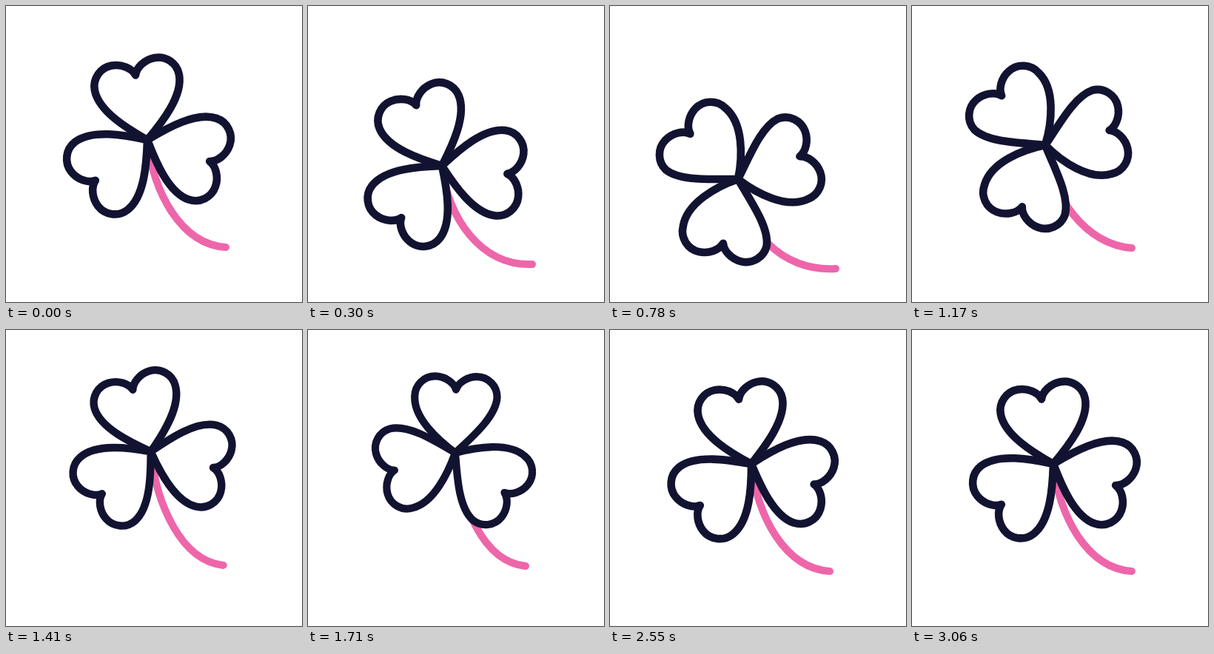
An HTML page that plays this animation: 400 px wide and 400 px high, repeating every 3.09 s.

```html
<!DOCTYPE html>
<html lang="en">
<head>
<meta charset="utf-8">
<title>Swaying clover</title>
<style>
  html, body { margin: 0; width: 100%; height: 100%; overflow: hidden; background: #fff; }
  svg { display: block; width: 100%; height: 100%; }
  path { stroke-linecap: round; stroke-linejoin: round; }
  #stem { fill: none; stroke: #ee66aa; stroke-width: 10; }
  .leaf { fill: #fff; stroke: #121331; stroke-width: 10.6; }
</style>
</head>
<body>
<svg viewBox="0 0 400 400">
  <path id="stem"/>
  <path class="leaf"/>
  <path class="leaf"/>
  <path class="leaf"/>
</svg>
<script>
const LOOP = 3090, STEP = 30;

// time, hub x, hub y, stem end x, stem end y, leaf angles (clockwise from up), bend at the base, leaf scale
const KEYS = [
  [0,    191, 181, 297, 326, -10.3, 109, 232, 0, 1],
  [300,  181, 216, 303, 349, -23, 97, 218, 0, 1],
  [540,  171, 239, 306, 358, -35, 84, 205, 4, 1],
  [780,  173, 234, 305, 355, -46.5, 69.7, 193, 8, 1],
  [1080, 177, 204, 300, 334, -46, 72, 196, 9, 1],
  [1170, 180, 188, 297, 327, -41.4, 77, 200.5, 8, 1],
  [1500, 200, 159, 293, 316, -8, 114, 239, -1, .97],
  [1710, 199, 166, 294, 319, 0.7, 129, 254, -4, .96],
  [2130, 191, 181, 297, 326, 4.4, 119, 239.7, -6, 1],
  [2550, 191, 181, 297, 326, -11, 108, 231, -1, 1],
  [3060, 191, 181, 297, 326, -10.3, 109, 232, 0, 1],
];

const stem = document.getElementById("stem");
const leaves = document.querySelectorAll(".leaf");

function slope(i, c) {
  const a = KEYS[i - 1], b = KEYS[i + 1];
  return a && b ? (b[c] - a[c]) / (b[0] - a[0]) : 0;
}

// Cubic Hermite interpolation of every column
function poseAt(t) {
  let i = 0;
  while (i < KEYS.length - 2 && t >= KEYS[i + 1][0]) i++;
  const a = KEYS[i], b = KEYS[i + 1], span = b[0] - a[0];
  const u = Math.min(1, (t - a[0]) / span), v = 1 - u;
  return a.slice(1).map((from, k) => {
    const c = k + 1;
    return from * v * v * (1 + 2 * u) + b[c] * u * u * (3 - 2 * u)
      + span * u * v * (v * slope(i, c) - u * slope(i + 1, c));
  });
}

function turn(x, y, deg) {
  const r = deg * Math.PI / 180, c = Math.cos(r), s = Math.sin(r);
  return [x * c - y * s, x * s + y * c];
}

// Heart with its point at the origin; bend twists the sides near that point
function heart(bend) {
  const root = side => turn(24 * side, -20, bend);
  const flank = side => turn(58 * side, -50, bend * .35);
  return `M0 0C${root(-1)} ${flank(-1)} -58-79C-58-95-45-107.5-29.5-107.5`
    + `C-16-107.5-3-99 0-89C3-99 16-107.5 29.5-107.5C45-107.5 58-95 58-79`
    + `C${flank(1)} ${root(1)} 0 0Z`;
}

function draw(now) {
  const t = Math.floor(now % LOOP / STEP) * STEP;
  const [x, y, ex, ey, a, b, c, bend, scale] = poseAt(t);
  const drop = ey - 326;
  stem.setAttribute("d",
    `M${x} ${y}C${x + 7} ${y + 69} ${ex - 61 - drop * .37} ${ey - 4 + drop * .3} ${ex} ${ey}`);
  const shape = heart(bend);
  [a, b, c].forEach((angle, i) => {
    leaves[i].setAttribute("d", shape);
    leaves[i].setAttribute("transform", `translate(${x} ${y}) rotate(${angle}) scale(${scale})`);
  });
}

const start = performance.now();
function tick() {
  draw(performance.now() - start);
  requestAnimationFrame(tick);
}
tick();
</script>
</body>
</html>
```
